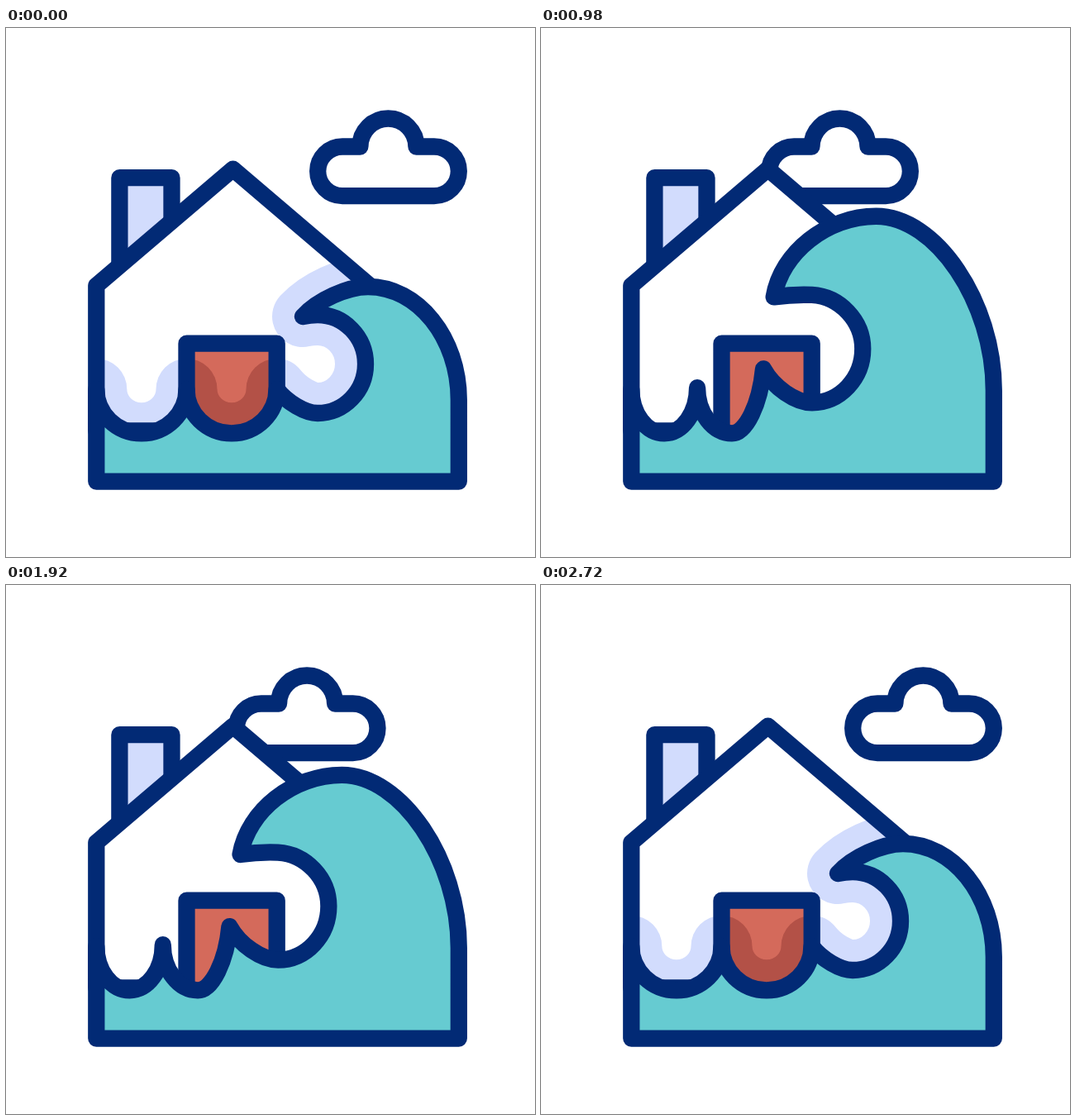
An HTML page with a canvas that plays this animation: 640 px wide and 640 px high, repeating every 2.92 s.

```html
<!DOCTYPE html>
<html>
<head>
<meta charset="utf-8">
<title>Flooded house</title>
<style>
html, body { margin: 0; width: 100%; height: 100%; overflow: hidden; background: #fff; }
canvas { display: block; width: 640px; height: 640px; }
</style>
</head>
<body>
<canvas id="stage" width="640" height="640"></canvas>
<script>
const ctx = document.getElementById('stage').getContext('2d');
const NAVY = '#022a75', LILAC = '#d2dcfd', TEAL = '#66cbd1', RED = '#d46a5b', DARK_RED = '#b35147';
const LINE = 20.3, SHADE = 74, LOOP = 2920, STEP = 20;
const LEFT = 109.3, RIGHT = 547.8, GROUND = 548.6, TROUGH = 490.3, ROUND = 0.55;

const clamp = x => Math.min(1, Math.max(0, x));
const smooth = x => x * x * (3 - 2 * x);
const mix = (a, b, t) => a + (b - a) * t;

// Cubic bezier easing with handles (.16, 0) and (0, 1).
function surge(x) {
  let lo = 0, hi = 1;
  for (let i = 0; i < 24; i++) {
    const s = (lo + hi) / 2;
    if (0.48 * s * (1 - s) ** 2 + s ** 3 < x) lo = s; else hi = s;
  }
  return smooth(lo);
}

// Goes from 0 to 1 at the centre and back, at a constant rate.
const ramp = (k, centre, half) => clamp(1 - Math.abs(k - centre) / half);

// A pen that draws arcs, each rounding off the corner between two points.
function pen(x, y) {
  const path = new Path2D();
  path.moveTo(x, y);
  const bend = (cx, cy, ex, ey, k = ROUND) => {
    path.bezierCurveTo(mix(x, cx, k), mix(y, cy, k), mix(ex, cx, k), mix(ey, cy, k), ex, ey);
    [x, y] = [ex, ey];
  };
  return { path, bend };
}

// Water line from the left wall to the right edge; p is 0 when calm, 1 at full height.
function surface(p) {
  const [peakX, peakY] = [218.5 - 31.2 * p, 437 - 2 * p];
  const [spikeX, spikeY] = [327.5 - 62 * p, 437 - 26 * p];
  const [tipX, tipY] = [359 - 82 * p, 349 - 25 * p];
  const [crestX, crestY] = [438 - 34.5 * p, 313 - 90.4 * p];
  const [curlX, curlY] = [377 - 52 * p, 406.5 - 19.5 * p];
  const [curlW, curlH] = [58 + 3.5 * p, 59.5 + 6 * p];
  const bottom = curlY + curlH, top = curlY - curlH, side = curlX + curlW;
  const firstX = (LEFT + peakX) / 2, secondX = 273 - 44.5 * p;

  const { path, bend } = pen(LEFT, 437);
  bend(LEFT, TROUGH, firstX, TROUGH);
  bend(peakX, TROUGH, peakX, peakY);
  bend(peakX, TROUGH, secondX, TROUGH);
  bend(spikeX - 8 * p, TROUGH, spikeX, spikeY);
  bend(spikeX + 22.5, bottom, curlX, bottom);
  bend(side, bottom, side, curlY);
  bend(side, top + 4 * p, curlX, top);
  bend((curlX + tipX) / 2, top - p, tipX, tipY);
  bend(tipX + 33 - 18 * p, crestY, crestX, crestY);
  bend(RIGHT, crestY, RIGHT, 450 - 12 * p, ROUND - 0.045 * p);
  return path;
}

function polyline(points, closed) {
  const path = new Path2D();
  points.forEach(([x, y]) => path.lineTo(x, y));
  if (closed) path.closePath();
  return path;
}

const house = polyline([[LEFT, 487.3], [LEFT, 311.6], [274.6, 170.6], [440, 311.6], [440, 487.3]], true);
const chimney = polyline([[137.4, 290], [137.4, 181.2], [200.5, 181.2], [200.5, 236]]);
const door = polyline([[218.5, 487], [218.5, 381.7], [327.7, 381.7], [327.7, 487]]);
const calm = surface(0);

const cloud = new Path2D();
cloud.arc(407, 173.3, 29.8, Math.PI / 2, Math.PI * 1.5);
cloud.arc(462.4, 143.5, 34, Math.PI, 0);
cloud.arc(518, 173.3, 29.8, -Math.PI / 2, Math.PI / 2);
cloud.closePath();

function fill(path, color) {
  ctx.fillStyle = color;
  ctx.fill(path);
}

function outline(path, color = NAVY, width = LINE) {
  ctx.strokeStyle = color;
  ctx.lineWidth = width;
  ctx.stroke(path);
}

// A filled shape with a band of shade along the calm water line.
function shaded(path, color, shade, alpha) {
  fill(path, color);
  ctx.save();
  ctx.clip(path);
  ctx.globalAlpha = alpha;
  ctx.lineCap = 'round';
  outline(calm, shade, SHADE);
  ctx.restore();
  outline(path);
}

function draw(ms) {
  const k = Math.floor((ms % LOOP) / STEP);
  const height = surge(ramp(k, 38.5, 28.7)) + surge(ramp(k, 107.9, 28.1));
  const drift = 145.5 * smooth(ramp(k, 72.1, 62.8));
  const shade = 1 - ramp(k, 72.85, 63.05) * 63.05 / 10.2;

  ctx.fillStyle = '#fff';
  ctx.fillRect(0, 0, 640, 640);
  ctx.lineJoin = 'round';

  ctx.save();
  ctx.translate(-drift, 0);
  fill(cloud, '#fff');
  outline(cloud);
  ctx.restore();

  fill(chimney, LILAC);
  outline(chimney);
  shaded(house, '#fff', LILAC, clamp(shade));
  shaded(door, RED, DARK_RED, clamp(shade));

  const wave = surface(height);
  wave.lineTo(RIGHT, GROUND);
  wave.lineTo(LEFT, GROUND);
  wave.closePath();
  fill(wave, TEAL);
  outline(wave);
}

const begin = performance.now();
function tick() {
  draw(performance.now() - begin);
  requestAnimationFrame(tick);
}
tick();
</script>
</body>
</html>
```
